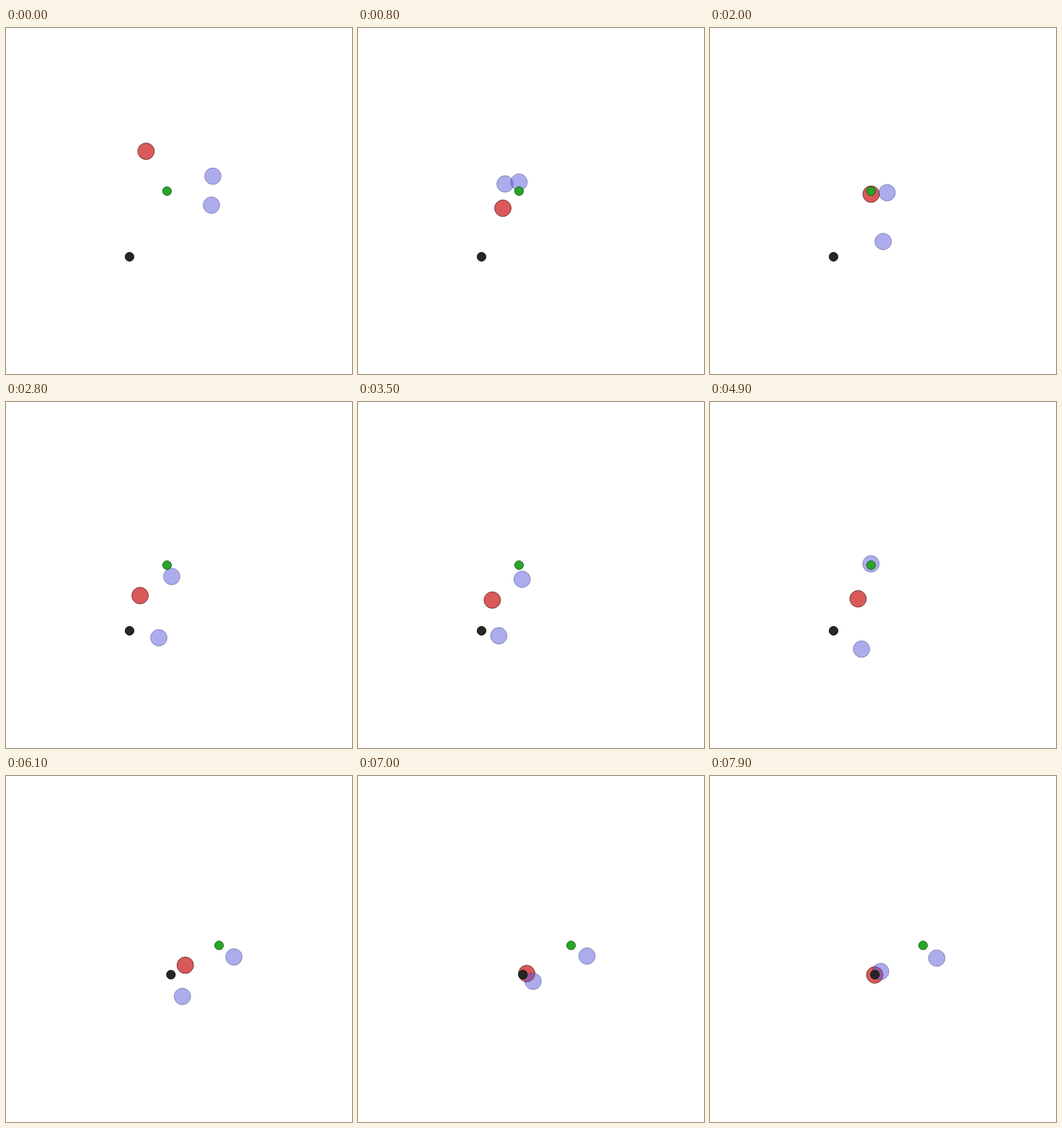
These frames come from a looping animation (480 px wide and 480 px high, 8000 ms). An HTML page:

```html
<!DOCTYPE html>
<html lang="en">
<head>
<meta charset="utf-8">
<title>Chasing discs</title>
<style>
  html, body { margin: 0; width: 100%; height: 100%; overflow: hidden; background: white; }
  svg { display: block; width: 100%; height: 100%; }
  .hunter { fill: #d95959; stroke: #502323bf; }
  .runner { fill: #5959d980; stroke: #2d2d6c66; }
  .goal { fill: #26a626; stroke: #0a4b0acc; }
  .decoy { fill: #262626; stroke: #111; }
</style>
</head>
<body>
<svg viewBox="0 0 480 480">
  <circle class="hunter" r="11.5"/>
  <circle class="runner" r="11.5"/>
  <circle class="runner" r="11.5"/>
  <circle class="goal" r="6.1"/>
  <circle class="decoy" r="6.1"/>
</svg>
<script>
const LOOP = 80, STEP_MS = 100, RESET = 50;
const discs = [...document.querySelectorAll('circle')];

// Waypoints are [step, x, y]; discs appear in drawing order.
const firstRound = [
  [[0, 194.3, 171], [8, 201, 250], [20, 223.5, 230.5], [27, 186, 266], [35, 186.3, 274.8],
     [40, 178, 276], [49, 205.4, 273]],
  [[0, 287, 205.6], [8, 204, 216.3], [10, 199, 221], [20, 240.2, 296.2], [28, 212, 327],
     [35, 195.3, 324.3], [45, 205, 349], [49, 210.2, 342.8]],
  [[0, 285, 245.8], [8, 223.4, 213.8], [11, 225, 196], [14, 256, 210], [20, 245.7, 228.5],
     [27, 231, 241], [35, 227.7, 245.9], [40, 235, 237], [49, 223.3, 224.6]],
  [[0, 223.4, 226.3]],
  [[0, 171.4, 317.4]]
];
const secondRound = [
  [[50, 183, 257], [61, 248.7, 262.5], [72, 231, 276], [79, 228.6, 276]],
  [[50, 228, 262], [61, 244.7, 305.8], [64, 245, 295], [79, 236.7, 271.2]],
  [[50, 276, 264], [55, 318, 241], [61, 316.2, 251], [65, 318.5, 249], [79, 314.6, 252.7]],
  [[50, 295.6, 235]],
  [[50, 228.8, 275.6]]
];

// Tangents are level wherever a coordinate turns back.
function slope(track, i, axis) {
  const here = track[i], a = track[i - 1] || here, b = track[i + 1] || here;
  if ((here[axis] - a[axis]) * (b[axis] - here[axis]) < 0) return 0;
  return (b[axis] - a[axis]) / (b[0] - a[0]);
}

function place(track, step, axis) {
  const next = track.findIndex(point => point[0] > step);
  if (next < 0) return track.at(-1)[axis];
  const a = track[next - 1], b = track[next], span = b[0] - a[0];
  const u = (step - a[0]) / span, v = 1 - u;
  return v * v * (1 + 2 * u) * a[axis] + u * u * (1 + 2 * v) * b[axis]
    + span * u * v * (v * slope(track, next - 1, axis) - u * slope(track, next, axis));
}

function draw(ms) {
  const step = Math.floor(ms / STEP_MS) % LOOP;
  const tracks = step < RESET ? firstRound : secondRound;
  discs.forEach((disc, i) => {
    disc.setAttribute('cx', place(tracks[i], step, 1));
    disc.setAttribute('cy', place(tracks[i], step, 2));
  });
}

const start = performance.now();
function tick() {
  draw(Math.max(0, performance.now() - start));
  requestAnimationFrame(tick);
}
tick();
</script>
</body>
</html>
```
